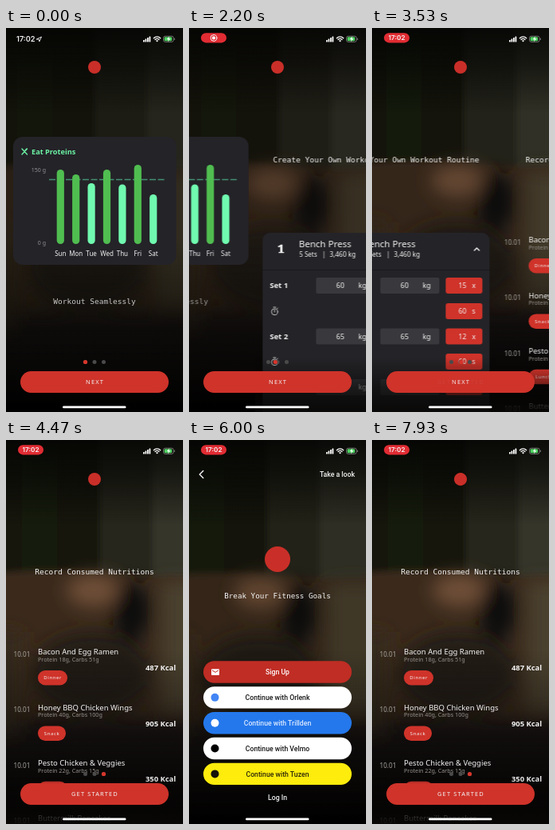
Write an HTML page that moves like this. It is 222 px wide and 480 px high and loops after 8000 ms.

```html
<!DOCTYPE html>
<html lang="en">
<head>
<meta charset="utf-8">
<title>Fitness onboarding</title>
<style>
  html, body { margin: 0; width: 100%; height: 100%; overflow: hidden; background: #0b0b09; }
  svg { display: block; width: 222px; height: 480px; }
  text { font-family: "Noto Sans", sans-serif; fill: #f4f4f4; white-space: pre; }
  .ui { font-family: Roboto, sans-serif; font-size: 8.7px; font-weight: 500; }
  .clock { font: 600 9.6px Inter, sans-serif; }
  .mono { font-family: "DejaVu Sans Mono", monospace; font-size: 9.55px; }
  .mid { text-anchor: middle; }
  .end { text-anchor: end; }
  .line { fill: none; stroke: #f4f4f4; stroke-linecap: round; stroke-linejoin: round; }
  .cta { font-size: 7.5px; letter-spacing: 1.1px; }

  .anim { animation: 8s linear infinite; }
  #page1 { animation-name: page1; }
  #page2 { animation-name: page2; }
  #page3 { animation-name: page3; }
  #dot { animation-name: dot; }
  #next { animation-name: next; }
  #start { animation-name: start; }
  #app { animation-name: app; }
  #login { animation-name: login; }
  #actions { animation-name: actions; }
  #hero { animation-name: hero; }
  #time { animation-name: time; }
  #pill { animation-name: pill; }
  #rec { animation-name: rec; }
  #pilltime { animation-name: pilltime; }
  #slogan { animation-name: slogan; }
  #photo { animation-name: photo; }

  @keyframes page1 {
    0%, 23.5% { transform: none; animation-timing-function: ease-in-out; }
    30.5%, 100% { transform: translateX(-222px); }
  }
  @keyframes page2 {
    0%, 23.5% { transform: translateX(222px); animation-timing-function: ease-in-out; }
    30.5%, 41.5% { transform: none; animation-timing-function: ease-in-out; }
    48.5%, 100% { transform: translateX(-222px); }
  }
  @keyframes page3 {
    0%, 41.5% { transform: translateX(222px); animation-timing-function: ease-in-out; }
    48.5%, 100% { transform: none; }
  }
  @keyframes dot {
    0%, 26% { transform: none; }
    28%, 44% { transform: translateX(11.5px); }
    46%, 100% { transform: translateX(23px); }
  }
  @keyframes next { 0%, 44% { opacity: 1; } 46%, 100% { opacity: 0; } }
  @keyframes start { 0%, 44% { opacity: 0; } 46%, 100% { opacity: 1; } }
  @keyframes app {
    0%, 64% { opacity: 1; animation-timing-function: ease-in-out; }
    71.5%, 84% { opacity: 0; animation-timing-function: ease-in-out; }
    91.5%, 100% { opacity: 1; }
  }
  @keyframes login {
    0%, 64% { opacity: 0; animation-timing-function: ease-in-out; }
    71.5%, 84% { opacity: 1; animation-timing-function: ease-in-out; }
    91.5%, 100% { opacity: 0; }
  }
  @keyframes actions {
    0%, 66.5% { opacity: 0; animation-timing-function: ease-in-out; }
    72.5%, 84% { opacity: 1; animation-timing-function: ease-in-out; }
    89.5%, 100% { opacity: 0; }
  }
  @keyframes hero {
    0%, 64% { transform: translate(111px, 49px); animation-timing-function: ease-in-out; }
    71.5%, 84% { transform: translate(111px, 149px) scale(2); animation-timing-function: ease-in-out; }
    91.5%, 100% { transform: translate(111px, 49px); }
  }
  @keyframes time { 0%, .8% { opacity: 1; } 3%, 100% { opacity: 0; } }
  @keyframes pill { 0%, .8% { opacity: 0; } 4%, 100% { opacity: 1; } }
  @keyframes rec { 0%, 38.7% { opacity: 1; } 41.5%, 100% { opacity: 0; } }
  @keyframes pilltime { 0%, 38.7% { opacity: 0; } 41.5%, 100% { opacity: 1; } }
  @keyframes slogan { 0%, 2% { opacity: .8; } 17.5%, 100% { opacity: .58; } }
  @keyframes photo {
    0%, 20% { transform: translate(-6px, 8px); opacity: .6; }
    40% { transform: translate(-3px, 4px); opacity: .85; }
    54%, 65% { transform: none; opacity: 1; }
    73%, 84% { transform: translate(-20px, 3px); opacity: .85; }
    92%, 100% { transform: none; opacity: 1; }
  }
</style>
</head>
<body>
<svg id="stage" viewBox="0 0 222 480" xmlns="http://www.w3.org/2000/svg"></svg>
<script>
const text = (x, y, s, size, cls = "", attrs = "") =>
  `<text x="${x}" y="${y}" class="${cls}" ${size ? `font-size="${size}"` : ""} ${attrs}>${s}</text>`;
const box = (x, y, w, h, r, fill) =>
  `<rect x="${x}" y="${y}" width="${w}" height="${h}" rx="${r}" fill="${fill}"/>`;
const disc = (x, y, r, fill) => `<circle cx="${x}" cy="${y}" r="${r}" fill="${fill}"/>`;
const oval = (x, y, rx, ry, fill) => `<ellipse cx="${x}" cy="${y}" rx="${rx}" ry="${ry}" fill="${fill}"/>`;
const line = (d, w = 1, attrs = "") => `<path class="line" d="${d}" stroke-width="${w}" ${attrs}/>`;
const group = (id, ...parts) => `<g id="${id}" class="anim">${parts.join("")}</g>`;
const blur = (id, ...parts) => `<g filter="url(#${id})">${parts.join("")}</g>`;
const RED = "#cf332a";

const defs = `<defs>
  <linearGradient id="shade" x2="0" y2="1"><stop offset="0" stop-color="#040403" stop-opacity=".85"/>
    <stop offset=".08" stop-color="#040403" stop-opacity=".6"/><stop offset=".22" stop-color="#040403" stop-opacity="0"/>
    <stop offset=".55" stop-color="#040403" stop-opacity="0"/><stop offset=".72" stop-color="#040403" stop-opacity=".35"/>
    <stop offset=".88" stop-color="#040403" stop-opacity=".78"/><stop offset="1" stop-color="#000"/></linearGradient>
  <linearGradient id="foot" x2="0" y2="1"><stop offset="0" stop-color="#080706" stop-opacity="0"/>
    <stop offset=".55" stop-color="#080706" stop-opacity=".6"/><stop offset="1" stop-color="#080706" stop-opacity=".93"/></linearGradient>
  <filter id="soft" filterUnits="userSpaceOnUse" x="-80" y="-40" width="400" height="560"><feGaussianBlur stdDeviation="4"/></filter>
  <filter id="softer" filterUnits="userSpaceOnUse" x="-80" y="-40" width="400" height="560"><feGaussianBlur stdDeviation="11"/></filter>
</defs>`;

// Out-of-focus room: dark wall and doorway above, a torso below
const backdrop = box(0, 0, 222, 480, 0, "#100f0c") +
  group("photo",
    blur("soft",
      box(-80, -40, 400, 230, 0, "#12160c"),
      box(20, -40, 44, 230, 0, "#161a0f"),
      box(118, -40, 200, 230, 0, "#26281e"),
      box(184, -40, 130, 230, 0, "#34362b"),
      `<path d="M-80 176Q20 158 111 166T310 164V520H-80Z" fill="#3b2b1c"/>`),
    blur("softer",
      oval(110, 188, 34, 20, "#6f4f38"),
      box(-80, 350, 400, 170, 0, "#1b1713"),
      oval(108, 292, 76, 52, "#221b13"),
      oval(158, 214, 24, 38, "#0f1107"),
      box(194, 175, 110, 165, 0, "#49402f"),
      box(-70, 240, 90, 130, 0, "#362c1f"))) +
  box(0, 0, 222, 480, 0, "url(#shade)");

// Protein chart
const days = ["Sun", "Mon", "Tue", "Wed", "Thu", "Fri", "Sat"];
const tops = [177, 183, 194, 177, 195.5, 171, 208];
const bars = days.map((day, i) => {
  const x = 68.3 + i * 19.4;
  return box(x - 4.6, tops[i], 9.2, 270 - tops[i], 4.6, tops[i] < 190 ? "#50bd50" : "#70fab0") +
    text(x, 285.3, day, 8, "mid");
}).join("");
const page1 = group("page1",
  box(9, 136, 204.5, 160, 12, "#242328"),
  line("M20 151L26.5 158M26.5 151L20 158M24 153L26 151", 1.4, 'style="stroke:#6cf2a4"'),
  text(32, 157.5, "Eat Proteins", 9.2, "", 'font-weight="600" style="fill:#6cf2a4"'),
  text(50, 179.6, "150 g", 7, "end", 'style="fill:#929196"'),
  text(50, 270.6, "0 g", 7, "end", 'style="fill:#929196"'),
  `<path d="M54 189.5H200" stroke="#438f6f" stroke-width="1.3" stroke-dasharray="8 2.5"/>`,
  bars,
  group("slogan", text(111, 345.2, "Workout Seamlessly", 0, "mono mid")));

// Workout routine
const redCell = (y, n, unit) => box(158, y - 10, 46, 20, 3, RED) +
  text(184, y + 3, n, 8.8, "end") + text(191, y + 3, unit, 8.8);
const setRow = (y, n, kg, reps) => text(18, y + 3, `Set ${n}`, 9.5, "", 'font-weight="600"') +
  box(76, y - 10, 74, 20, 2, "#39383c") + text(106.5, y + 3, kg, 9, "mid") +
  text(129, y + 3, "kg", 9) + redCell(y, reps, "x");
const restRow = y => `<g opacity=".75"><circle class="line" cx="24" cy="${y + .8}" r="3.9"/>` +
  line(`M22.5 ${y - 5}H25.5M24 ${y - 1.5}V${y + 1}M27.2 ${y - 3.2}L28 ${y - 4}`) + `</g>` + redCell(y, 60, "s");
const page2 = group("page2",
  text(111, 168.3, "Create Your Own Workout Routine", 0, "mono mid"),
  box(9, 256, 204, 240, 9, "#242428"),
  `<path d="M9 302.5H213" stroke="#1a1a1d"/>`,
  `<text x="32" y="281" class="mid" style="font:900 14.5px 'Noto Serif',serif" stroke="#f4f4f4" stroke-width=".7">1</text>`,
  text(54.5, 274, "Bench Press", 11.5),
  text(55, 285.7, "5 Sets", 8), text(86, 285.7, "|", 8, "mid"), text(93, 285.7, "3,460 kg", 8.3),
  line("M194 278L197 275L200 278", 1.4),
  setRow(322, 1, 60, 15), restRow(354), setRow(385.5, 2, 65, 12), restRow(417), setRow(449, 3, 70, 10),
  box(0, 412, 222, 68, 0, "url(#foot)"));

// Nutrition log
const meals = [
  ["Bacon And Egg Ramen", 18, 51, "Dinner", 487],
  ["Honey BBQ Chicken Wings", 40, 100, "Snack", 905],
  ["Pesto Chicken &amp; Veggies", 22, 15, "Lunch", 350],
  ["Buttermilk Pancakes", 12, 60, "Snack", 420]
];
const mealRow = ([name, protein, carbs, kind, kcal], i) =>
  `<g transform="translate(0 ${i * 69.4})">` +
  text(9.5, 271, "10.01", 8.2, "", 'style="fill:#a5a29e"') +
  text(40, 268.3, name, 9.5) +
  text(40, 276.8, `Protein ${protein}g, Carbs ${carbs}g`, 7.2, "", 'style="fill:#96918c"') +
  box(40, 288, kind === "Snack" ? 35 : 37, 18.5, 9.2, RED) +
  text(kind === "Snack" ? 57.5 : 58.7, 299.4, kind, 6, "mid", 'letter-spacing=".6"') +
  text(213, 288.4, `${kcal} Kcal`, 9.4, "end", 'font-weight="700"') + `</g>`;
const page3 = group("page3",
  text(111, 168.3, "Record Consumed Nutritions", 0, "mono mid"),
  meals.map(mealRow).join(""),
  box(0, 422, 222, 58, 0, "url(#foot)"));

const app = group("app", page1, page2, page3,
  [99.5, 111, 122.5].map(x => disc(x, 417.5, 2.5, "#4b4a4a")).join(""),
  group("dot", disc(99.5, 417.5, 2.6, "#d8352b")),
  box(18, 429, 186, 27, 13.5, RED),
  group("next", text(111.5, 444.6, "NEXT", 0, "cta mid")),
  group("start", text(111.5, 444.8, "GET STARTED", 0, "cta mid")));

// Sign-in screen
const choices = [
  ["Sign Up", "#c02d24", "#fff"],
  ["Continue with Orlenk", "#fff", "#151515", "#4285f4"],
  ["Continue with Trillden", "#2478ec", "#dce9ff", "#fff"],
  ["Continue with Velmo", "#fff", "#151515", "#000"],
  ["Continue with Tuzen", "#fdec0c", "#2a2508", "#151209"]
];
const choice = ([label, fill, ink, mark], i) => {
  const y = 276.3 + i * 31.85;
  return box(18, y, 186, 27.4, 13.7, fill) +
    text(111, y + 16.8, label, 0, "ui mid", `style="fill:${ink}"`) +
    (mark ? disc(32.5, y + 13.7, 5, mark)
      : box(28, y + 10, 10, 7.6, 1, "#fff") +
        `<path d="M29 ${y + 11.5}l4 2.6 4-2.6" fill="none" stroke="${fill}"/>`);
};
const login = group("login",
  line("M17.8 38.5L13.3 43L17.8 47.5", 1.4),
  text(208, 45.8, "Take a look", 0, "ui end"),
  text(111, 198, "Break Your Fitness Goals", 0, "mono mid", 'style="font-size:9.25px"')) +
  group("actions", choices.map(choice).join(""), text(111, 450, "Log In", 0, "ui mid"));

const arc = (r, w) => line(`M${189.5 - r * .75} ${17 - r * .75}A${r} ${r} 0 0 1 ${189.5 + r * .75} ${17 - r * .75}`, w);
const status = group("time", text(13, 17.4, "17:02", 0, "clock", 'style="font-size:9.2px"'),
    line("M38.5 14L44.5 11L41.8 17L41.2 14.3Z", .9)) +
  group("pill", box(15, 6.2, 32, 12.2, 6.1, "#e12c33"),
    group("rec", `<circle class="line" cx="31" cy="12.4" r="3.9"/>`, disc(31, 12.4, 2.1, "#fff")),
    group("pilltime", text(31, 15.4, "17:02", 0, "clock mid", 'style="font-size:8.2px"'))) +
  [0, 1, 2, 3].map(i => box(172 + i * 2.5, 15 - i * 1.5, 1.8, 2.4 + i * 1.5, .5, "#fff")).join("") +
  arc(5.6, 1.3) + arc(3.3, 1.3) + disc(189.5, 16.2, 1.1, "#fff") +
  `<rect x="197.5" y="10.2" width="12.5" height="7.2" rx="2.2" fill="none" stroke="#8c8c88" stroke-width=".8"/>` +
  box(198.6, 11.3, 9.5, 5, 1.2, "#4fd262") + box(210.7, 12.6, 1, 2.4, .5, "#8c8c88") +
  `<path d="M204.8 10.3L201.8 14.2H203.8L203.1 17.3L206.2 13.3H204.2Z" fill="#fff"/>`;

document.getElementById("stage").innerHTML = defs + backdrop + app + login +
  group("hero", disc(0, 0, 8, "#c92f28")) + status + box(71, 472.6, 79.5, 2.7, 1.35, "#fff");
</script>
</body>
</html>
```
